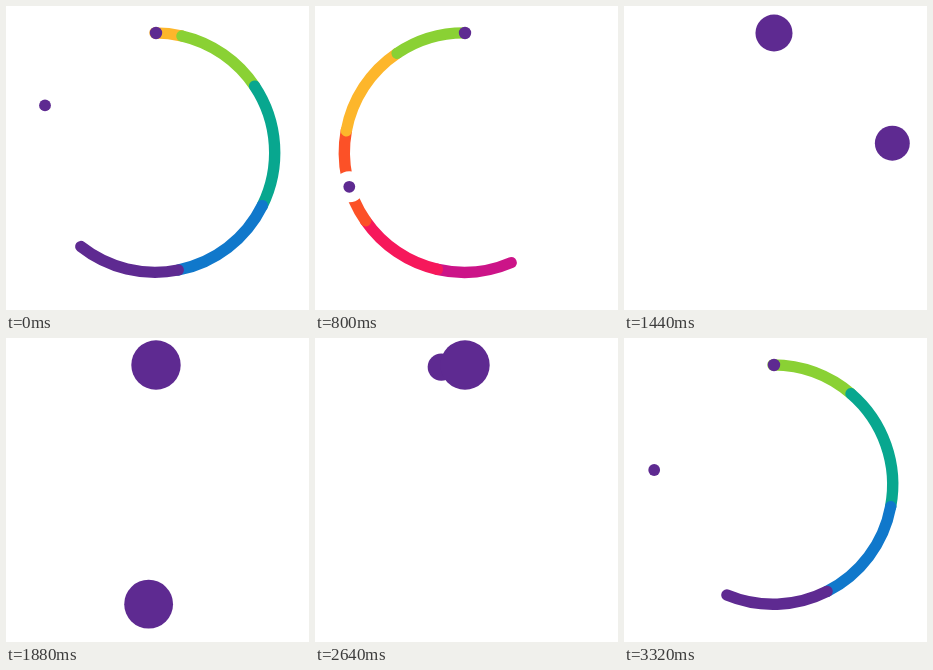
An HTML page for the animation above (3360 ms loop, 303x304 px).

```html
<!DOCTYPE html>
<html lang="en">
<head>
<meta charset="utf-8">
<title>Colour ring</title>
<style>
  html, body { margin: 0; width: 100%; height: 100%; overflow: hidden; background: #fff; }
  svg { display: block; width: 100%; height: 100%; }
  path { fill: none; stroke-width: 11.4; stroke-linecap: round; }
</style>
</head>
<body>
<svg id="stage" viewBox="0 0 303 304" preserveAspectRatio="xMinYMin meet"></svg>
<script>
const STEP = 40, STEPS = 84, LAUNCH = 70;
const CX = 149, CY = 146.6, R = 119.7;
const PURPLE = '#5e2a91';
const SMALL = 6, BIG = 24.5;

// Ribbon colours from head to tail, and where each ends behind the head (degrees).
const COLORS = [PURPLE, '#1078cb', '#08a78f', '#8ad134', '#fdb62b', '#fc5127', '#f6185b', '#cc1488'];
const ENDS = [0, 49.5, 102, 162, 205.3, 250.8, 296, 338.5, 374.5];

// Orbiting dot: [steps since launch, degrees], three laps per loop.
const ORBIT = [[0, 12], [4, 118.2], [8, 196], [13, 277], [26, 487.9], [34, 613.4],
               [41.4, 729], [50, 805.5], [72, 999.5], [81, 1076], [84, 1092]];

const stage = document.getElementById('stage');

function add(tag, attrs) {
  const el = document.createElementNS('http://www.w3.org/2000/svg', tag);
  stage.appendChild(el);
  return set(el, attrs);
}

function set(el, attrs) {
  for (const key in attrs) el.setAttribute(key, attrs[key]);
  return el;
}

// Tail first, so that each piece nearer the head overlaps the one behind it.
const pieces = COLORS.map((_, i) => COLORS.length - 1 - i)
  .map(i => ({ el: add('path', { stroke: COLORS[i] }), front: ENDS[i], back: ENDS[i + 1] }));
const halo = add('circle', { fill: '#fff' });
const dot = add('circle', { fill: PURPLE });
const anchor = add('circle', { fill: PURPLE, cx: 150, cy: 27 });

const ramp = (n, start) => Math.min(1, Math.max(0, (n - start) / 12));

function radius(n, grow, shrink) {
  const size = ramp(n, grow) - ramp(n, shrink) + 1 - ramp(n + STEPS, shrink);
  return SMALL + (BIG - SMALL) * size;
}

function point(deg) {
  const a = deg * Math.PI / 180;
  return [CX + R * Math.sin(a), CY - R * Math.cos(a)];
}

const slopes = ORBIT.slice(1).map(([x, y], i) => (y - ORBIT[i][1]) / (x - ORBIT[i][0]));
const tangents = ORBIT.map((_, i) => {
  const a = slopes[i - 1] ?? slopes[i], b = slopes[i] ?? a;
  return 2 * a * b / (a + b);
});

// Monotone cubic through the orbit points.
function orbitAngle(n) {
  let i = 0;
  while (i < slopes.length - 1 && n >= ORBIT[i + 1][0]) i++;
  const [x0, y0] = ORBIT[i], [x1, y1] = ORBIT[i + 1];
  const w = x1 - x0, u = (n - x0) / w, v = 1 - u;
  return y0 * (1 + 2 * u) * v * v + y1 * (3 - 2 * u) * u * u
    + w * u * v * (tangents[i] * v - tangents[i + 1] * u);
}

function arc(from, to) {
  return `M${point(from)}A${R} ${R} 0 0 1 ${point(to)}`;
}

function render(ms) {
  const step = Math.floor(ms / STEP) % STEPS;
  const n = (step - LAUNCH + STEPS) % STEPS;
  const head = 15.65 * n - 0.8;

  for (const { el, front, back } of pieces) {
    const from = Math.max(0, head - back), to = Math.min(360, head - front);
    set(el, { d: to > from ? arc(from, to) : '' });
  }

  const [cx, cy] = point(orbitAngle(n));
  const r = radius(n, 42.5, 73);
  set(dot, { cx, cy, r: r - 0.1 });
  set(halo, { cx, cy, r: r + 9.5 });
  set(anchor, { r: radius(n, 42, 82.5) + 0.2 });
}

let start;
function tick(now) {
  start ??= now;
  render(now - start);
  requestAnimationFrame(tick);
}
render(0);
requestAnimationFrame(tick);
</script>
</body>
</html>
```
